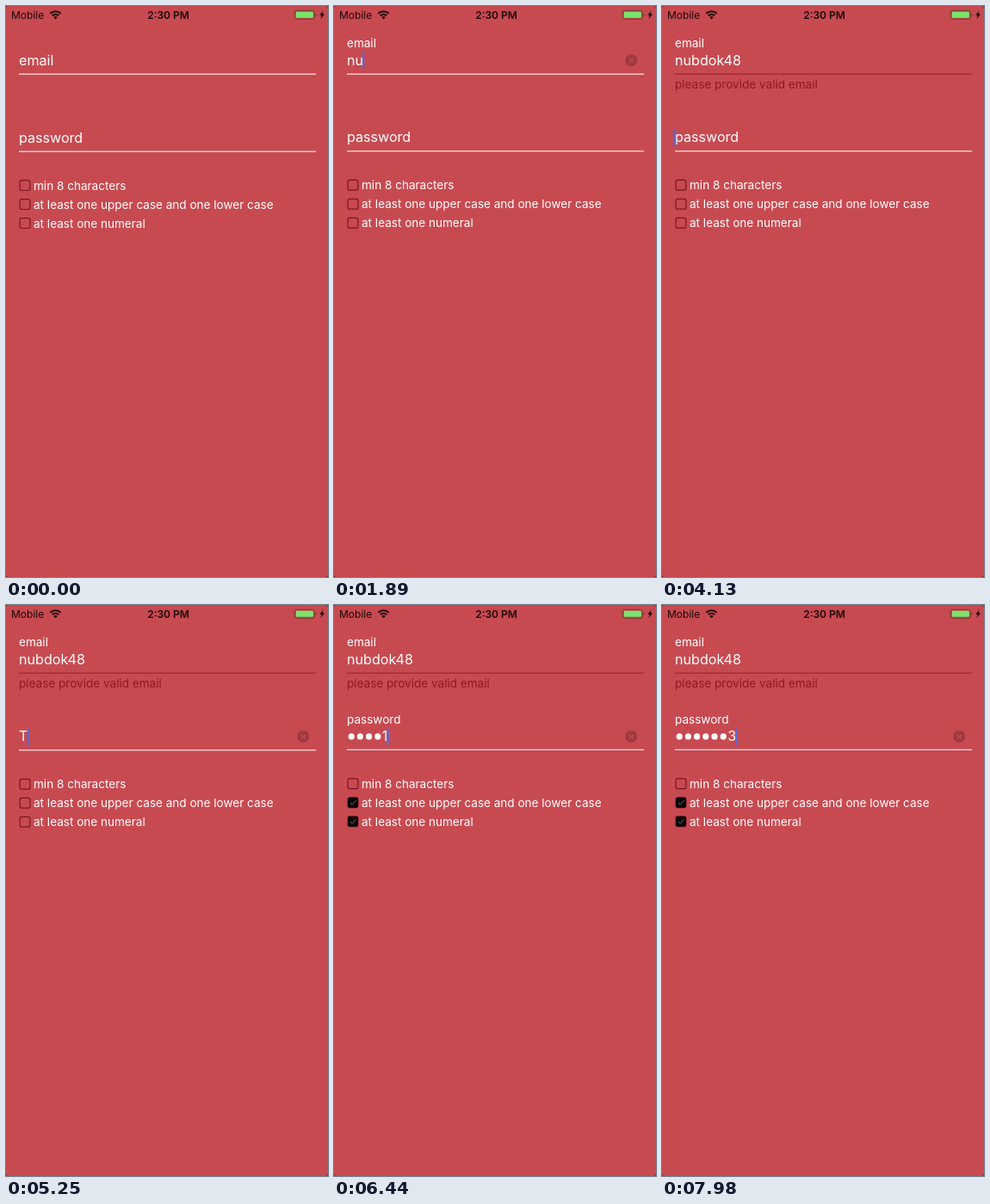
Animation, 374 px wide and 664 px high, one loop 8000 ms. Source, as an HTML page:

```html
<!DOCTYPE html>
<html lang="en">
<head>
<meta charset="utf-8">
<title>Sign-up form</title>
<style>
html, body { margin: 0; width: 100%; height: 100%; overflow: hidden; background: #7d2b31; }
svg { display: block; width: 100vw; height: 100vh; font-family: Inter, Roboto, sans-serif; }
text { fill: #fff; white-space: pre; }
.status { font-size: 12px; fill: #1d0709; }
.clock { font-weight: 600; }
.input { font-size: 16.1px; }
.small { font-size: 13.55px; }
.error { fill: #8f1824; }
.box { fill: none; stroke: #7c1420; stroke-width: 1.2; }
.tick { fill: none; stroke: #587563; stroke-width: 1; }
</style>
</head>
<body>
<svg viewBox="0 0 374 664">
  <rect width="374" height="664" rx="3" fill="#c84a51"/>

  <text class="status" x="6" y="14.6">Mobile</text>
  <g fill="none" stroke="#1d0709" stroke-width="2">
    <path d="M51.4 8.7a8.6 8.6 0 0 1 12.2 0M53.8 11.3a5.2 5.2 0 0 1 7.4 0"/>
    <path d="M57.5 15.4l-2.2-2.4a3.2 3.2 0 0 1 4.4 0z" fill="#1d0709" stroke="none"/>
  </g>
  <text class="status clock" x="188.5" y="14.6" text-anchor="middle">2:30 PM</text>
  <rect x="335.3" y="5.3" width="23" height="10" rx="2.4" fill="none" stroke="#713830"/>
  <rect x="336.8" y="6.8" width="20" height="7" rx="1.2" fill="#78e56c"/>
  <path d="M360 8.6q2 1.7 0 3.4z" fill="#713830"/>
  <path d="M368.6 5.6l-4.4 5.2h2.5l-1.3 4.3 4.7-5.5h-2.6z" fill="#1d0709"/>

  <g id="email"></g>
  <g id="password"></g>
  <g id="rules"></g>
  <rect id="caret" width="2.2" height="19.4" rx="1" fill="#5b66d8"/>
</svg>
<script>
const LOOP = 8000;
const USER = 'nubdok48';
const SECRET = 'Test123';
const USER_TIMES = [1470, 1680, 1960, 2240, 2450, 2730, 3080, 3290];
const SECRET_TIMES = [5250, 5530, 5950, 6160, 6440, 6930, 7630];
const FOCUS = 840, SWITCH = 3710;
const DOT_STEP = 10.2, LEFT = 15;
const RULES = [
  ['min 8 characters', Infinity],
  ['at least one upper case and one lower case', SECRET_TIMES[1]],
  ['at least one numeral', SECRET_TIMES[4]]
];

const $ = id => document.getElementById(id);
const clamp = v => Math.max(0, Math.min(1, v));
const ease = v => 1 - (1 - clamp(v)) ** 3;
const typed = (times, t) => times.filter(at => at <= t).length;

function add(parent, tag, attrs, text = '') {
  const el = document.createElementNS('http://www.w3.org/2000/svg', tag);
  set(el, attrs);
  el.textContent = text;
  return parent.appendChild(el);
}

function set(el, attrs) {
  for (const key in attrs) el.setAttribute(key, attrs[key]);
}

function makeField(id, y) {
  const root = $(id);
  const field = {
    root, y,
    label: add(root, 'text', { class: 'small', x: LEFT }, id),
    hint: add(root, 'text', { class: 'input', x: LEFT, y: y + 5.8 }, id),
    dots: add(root, 'g', { fill: '#fff' }),
    value: add(root, 'text', { class: 'input', y: y + 5.8 }),
    line: add(root, 'rect', { x: LEFT, y: y + 15.6, width: 345, height: 1.2 }),
    clear: add(root, 'g', { transform: `translate(345.3 ${y + 0.3})` })
  };
  add(field.clear, 'circle', { r: 7, fill: '#9f3940' });
  add(field.clear, 'path', { d: 'M-2.6-2.6l5.2 5.2m0-5.2l-5.2 5.2', stroke: '#c84a51', 'stroke-width': 1.1 });
  return field;
}

const email = makeField('email', 63);
const password = makeField('password', 153);
const error = add(email.root, 'text', { class: 'small error', x: LEFT, y: 96 }, 'please provide valid email');
const dots = [...SECRET].map((_, i) =>
  add(password.dots, 'circle', { cx: LEFT + 5.2 + i * DOT_STEP, cy: 153.3, r: 3.6 }));

const ticks = RULES.map(([label], i) => {
  const y = 208.6 + i * 22;
  const row = $('rules');
  add(row, 'rect', { class: 'box', x: 16.1, y: y - 5.9, width: 11.8, height: 11.8, rx: 2.2 });
  add(row, 'text', { class: 'small', x: 32, y: y + 5.1 }, label);
  const tick = add(row, 'g', {});
  add(tick, 'rect', { x: 16, y: y - 6, width: 12, height: 12, rx: 2.4, fill: '#0b0405' });
  add(tick, 'path', { class: 'tick', d: `M18.8 ${y + 0.2}l2.3 2.4 4.6-5` });
  return tick;
});

function drawField(field, t, start, text, x, active) {
  const p = ease((t - start) / 280);
  const filled = t >= start;
  set(field.label, { y: field.y - 14.6 + 7 * (1 - p), opacity: filled ? p : 0 });
  set(field.hint, { opacity: filled ? 0 : 1 });
  set(field.clear, { opacity: filled && active ? 1 : 0 });
  field.value.textContent = text;
  set(field.value, { x });
}

// Solid after a key press, then blinking with soft edges.
function blink(since) {
  const s = since % 1000;
  return s < 560 ? 1 : s < 660 ? (660 - s) / 100 : s < 900 ? 0 : (s - 900) / 100;
}

function render(t) {
  const inEmail = t < SWITCH;
  const userCount = typed(USER_TIMES, t);
  const count = typed(SECRET_TIMES, t);
  const hidden = Math.max(0, count - 1);
  const x = LEFT + hidden * DOT_STEP;

  drawField(email, t, USER_TIMES[0], USER.slice(0, userCount), LEFT, inEmail);
  drawField(password, t, SECRET_TIMES[0], SECRET.slice(hidden, count), x, !inEmail);
  dots.forEach((dot, i) => set(dot, { opacity: i < hidden ? 1 : 0 }));

  const bad = ease((t - SWITCH) / 200);
  set(error, { opacity: bad });
  const mix = (a, b) => Math.round(a + (b - a) * bad);
  set(email.line, { fill: `rgb(${mix(249, 158)},${mix(230, 36)},${mix(232, 46)})` });

  // Each floating label nudges what lies below it up a little.
  const rise = 0.4 * ease((t - USER_TIMES[0]) / 280);
  const nudge = 0.5 * ease((t - SECRET_TIMES[0]) / 280);
  set(password.root, { transform: `translate(0 ${-rise})` });
  set(password.line, { fill: '#f9e6e8', y: password.y + 15.6 - nudge });
  set($('rules'), { transform: `translate(0 ${-rise - nudge})` });
  ticks.forEach((tick, i) => set(tick, { opacity: t >= RULES[i][1] ? 1 : 0 }));

  const field = inEmail ? email : password;
  const value = field.value;
  const length = value.textContent ? value.getComputedTextLength() : 0;
  const keys = [FOCUS, SWITCH, ...USER_TIMES, ...SECRET_TIMES].filter(k => k <= t);
  set($('caret'), {
    x: (inEmail ? LEFT : x) + length - 0.9,
    y: field.y - 9.5,
    opacity: keys.length ? blink(t - Math.max(...keys)) : 0
  });
}

const origin = performance.now();
function tick() {
  render((performance.now() - origin) % LOOP);
  requestAnimationFrame(tick);
}
tick();
</script>
</body>
</html>
```
